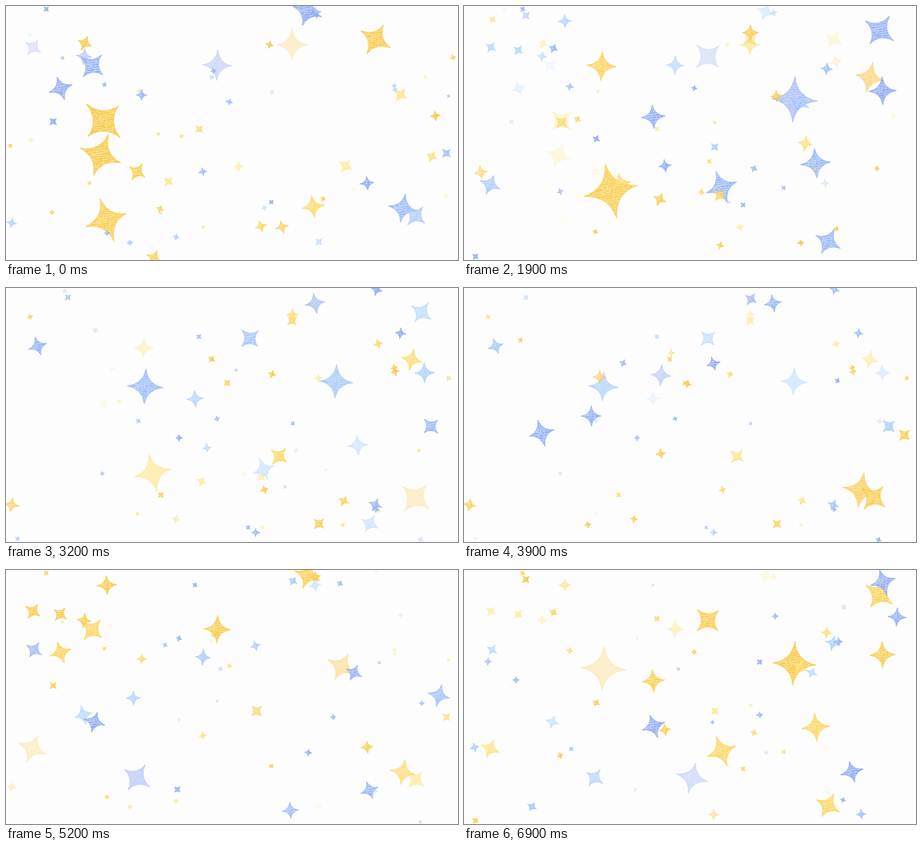
An HTML page with a canvas for the animation above (7000 ms loop, 640 by 360 pixels).

```html
<!DOCTYPE html>
<html lang="en">
<head>
<meta charset="utf-8">
<title>Twinkling crayon stars</title>
<style>
  html, body { margin: 0; width: 100%; height: 100%; overflow: hidden; background: #fdfdfd; }
  canvas { display: block; width: 640px; height: 360px; }
</style>
</head>
<body>
<canvas id="sky" width="640" height="360"></canvas>
<script>
const W = 640, H = 360;
const LOOP = 7000, STEP = 100;
const LIFE = 2.7;      // seconds a star stays visible
const REVISIT = 4.75;  // a blue star returns in gold after this long
const SHRINK = 5;      // seconds to shrink to nothing
const COUNT = 160;
const BLUE = [[132, 156, 240], [165, 215, 255]];
const GOLD = [[246, 191, 48], [255, 232, 112]];
const ctx = document.getElementById('sky').getContext('2d');

// Largest stars: x, y, arm length, tilt in degrees, birth in seconds
const large = [
  [138, 163, 36, 45, -5.2], [134, 212, 35, 20, -5.3], [143, 303, 36, -18, -5.5],
  [523, 47, 27, 30, -5.3], [405, 55, 23, 0, -4.8], [195, 85, 27, 3, -3.9],
  [208, 262, 46, -12, -3.6], [427, 8, 23, 20, -0.4], [562, 287, 27, 10, -1.1],
  [580, 297, 25, 40, -1.6], [122, 85, 23, 40, -0.7], [299, 84, 22, 2, -0.1],
  [588, 35, 28, 35, 1.2], [365, 257, 28, -20, 1], [498, 223, 26, -5, 1],
  [515, 334, 24, 28, 1], [467, 133, 34, 3, 1.7], [197, 140, 33, 3, 2.1]
];

// Uniform random numbers from a fixed seed
function seeded(seed) {
  return () => (seed = (seed * 16807) % 2147483647) / 2147483647;
}
const rand = seeded(2917);

function makeStar([x, y, size, tilt, birth]) {
  const arms = Array.from('nesw', () => 0.94 + rand() * 0.12);
  return { x, y, size, tilt: tilt * Math.PI / 180, birth, arms, phase: rand() * 6 };
}

const stars = large.map(makeStar);
for (let i = 0; i < COUNT; i++) {
  const birth = -7.5 + 14.5 * (i + rand()) / COUNT;
  stars.push(makeStar([rand() * W, rand() * H, 4 + 19 * rand() ** 2.2, rand() * 70 - 20, birth]));
}

function makeGrain() {
  const tile = document.createElement('canvas');
  const size = tile.width = tile.height = 96;
  const g = tile.getContext('2d');
  g.fillStyle = 'rgba(255,255,255,.5)';
  for (let i = 0; i < 2200; i++) {
    g.fillRect(Math.floor(rand() * size), Math.floor(rand() * size), 1, 1);
  }
  return ctx.createPattern(tile, 'repeat');
}
const grain = makeGrain();

function starPath(r, arms) {
  const polar = (turn, d) => {
    const a = turn * Math.PI / 2;
    return [Math.sin(a) * d, -Math.cos(a) * d];
  };
  const path = new Path2D();
  path.moveTo(...polar(0, r * arms[0]));
  arms.forEach((_, i) => {
    const next = (i + 1) % arms.length;
    path.quadraticCurveTo(...polar(i + 0.5, r * 0.18), ...polar(next, r * arms[next]));
  });
  path.closePath();
  return path;
}

// Pale gaps between crayon strokes
function hatch(r, phase) {
  const half = r * 0.7;
  ctx.strokeStyle = 'rgba(255,255,255,.5)';
  ctx.lineWidth = 0.8;
  ctx.beginPath();
  for (let y = -r, i = 0; y < r; y += 3.4, i++) {
    const w = Math.sin(i * 2.3 + phase) * 2;
    ctx.moveTo(-half, y + w);
    ctx.quadraticCurveTo(0, y - w, half, y + w * 0.4);
  }
  ctx.stroke();
}

function drawStar(star, age, [fresh, faded]) {
  if (age <= 0 || age >= LIFE) return;
  const k = age / LIFE;
  const r = star.size * (1 - age / SHRINK);
  const color = `rgb(${fresh.map((c, i) => Math.round(c + (faded[i] - c) * k))})`;
  const path = starPath(r, star.arms);
  ctx.save();
  ctx.globalAlpha = Math.min(0.15 + age / 0.4, 1) * 0.92 * (1 - k ** 3);
  ctx.translate(star.x, star.y);
  ctx.rotate(star.tilt);
  ctx.fillStyle = color;
  ctx.fill(path);
  ctx.save();
  ctx.clip(path);
  ctx.rotate(-star.tilt - 0.15);
  ctx.fillStyle = grain;
  ctx.fillRect(-r * 1.1, -r * 1.1, r * 2.2, r * 2.2);
  if (r > 9) hatch(r, star.phase);
  ctx.restore();
  ctx.strokeStyle = color;
  ctx.lineWidth = 0.8;
  ctx.lineJoin = 'round';
  ctx.stroke(path);
  ctx.restore();
}

function draw(t) {
  ctx.fillStyle = '#fdfdfd';
  ctx.fillRect(0, 0, W, H);
  for (const star of stars) {
    drawStar(star, t - star.birth, BLUE);
    drawStar(star, t - star.birth - REVISIT, GOLD);
  }
}

const start = performance.now();
let shown = -1;
function tick() {
  const step = Math.floor(((performance.now() - start) % LOOP) / STEP);
  if (step !== shown) {
    shown = step;
    draw(step * STEP / 1000);
  }
  requestAnimationFrame(tick);
}
tick();
</script>
</body>
</html>
```
